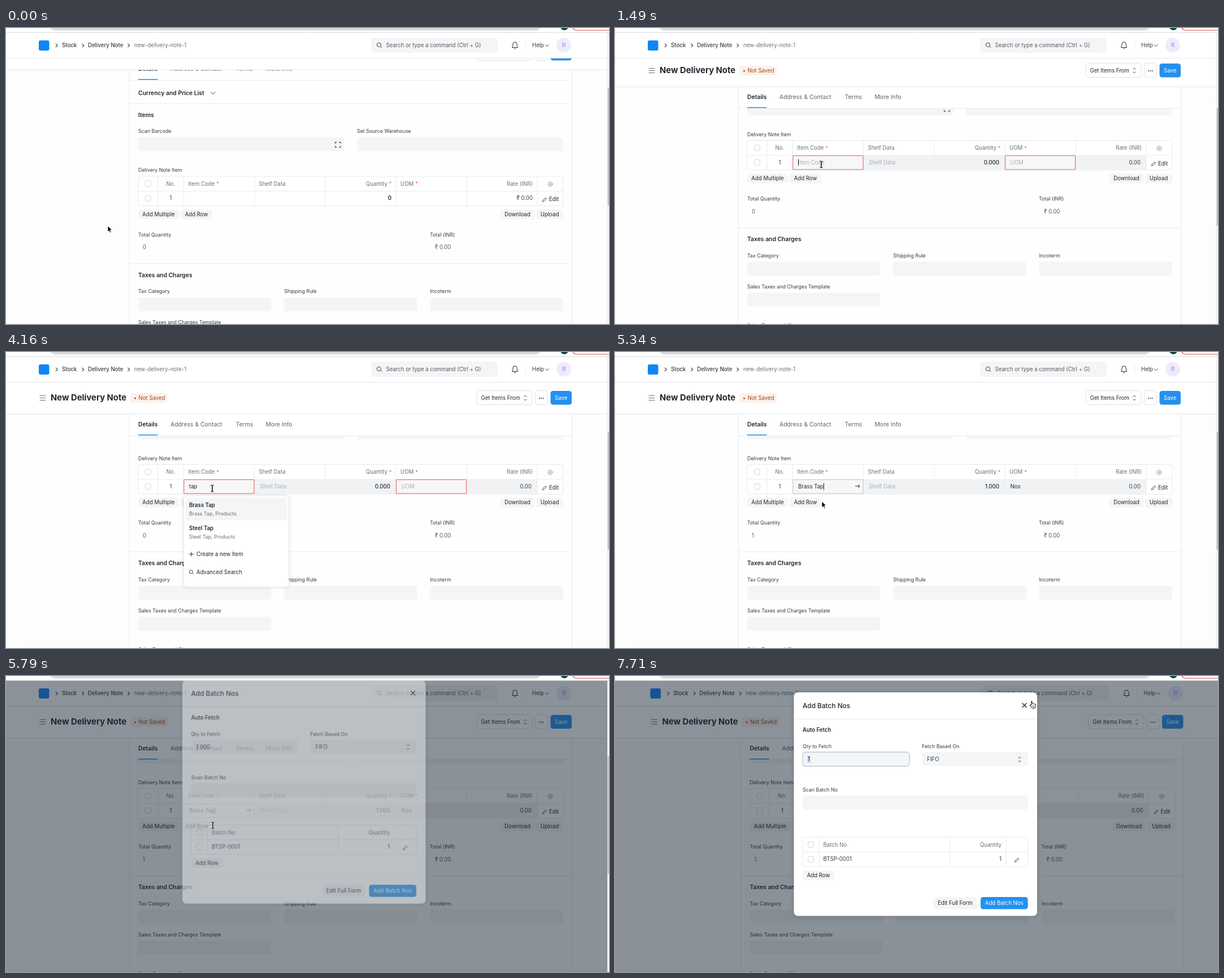
Write an HTML page with a canvas that moves like this. It is 1067 px wide and 525 px high and loops after 8 s.

```html
<!DOCTYPE html>
<html lang="en">
<head>
<meta charset="utf-8">
<title>Delivery note</title>
<style>
  html, body { margin: 0; width: 100%; height: 100%; overflow: hidden; background: #fff; }
  canvas { display: block; width: 1067px; height: 525px; }
</style>
</head>
<body>
<canvas id="stage"></canvas>
<script>
const W = 1067, H = 525, LOOP = 8000, STEP = 148.2;
const dpr = window.devicePixelRatio || 1;
const INK = '#1f272e', TEXT = '#333c44', MUTED = '#687178', HINT = '#a6b1b9';
const LINE = '#e8ebed', FIELD = '#f4f5f6', BLUE = '#2490ef', RED = '#f0625d';
const shade = alpha => `rgba(25,39,52,${alpha})`;
// Interface text sizes, in stage pixels
const SM = 8.9, MD = 9.63, LG = 10.37, XL = 11.85, XXL = 14.8;

function makeCanvas(el) {
  el.width = W * dpr;
  el.height = H * dpr;
  const c = el.getContext('2d');
  c.scale(dpr, dpr);
  return c;
}
const stage = makeCanvas(document.getElementById('stage'));
const layer = makeCanvas(document.createElement('canvas'));
let g = stage;

// y is the middle of the capital letters
function text(s, x, y, size = MD, color = TEXT, weight = 400, align = 'left') {
  g.font = `${weight} ${size}px Inter, sans-serif`;
  g.textAlign = align;
  g.fillStyle = color;
  g.fillText(s, x, y + size * 0.36);
  return g.measureText(s).width;
}

function rect(x, y, x2, y2, fill, r = 0, stroke, lw = 1) {
  g.beginPath();
  g.roundRect(x, y, x2 - x, y2 - y, r);
  if (fill) { g.fillStyle = fill; g.fill(); }
  if (stroke) { g.strokeStyle = stroke; g.lineWidth = lw; g.stroke(); }
}

function poly(pts, color, lw = 1, fill) {
  g.beginPath();
  for (let i = 0; i < pts.length; i += 2) g.lineTo(pts[i], pts[i + 1]);
  if (fill) { g.closePath(); g.fillStyle = fill; g.fill(); }
  g.strokeStyle = color;
  g.lineWidth = lw;
  g.stroke();
}

function circle(x, y, r, fill, stroke, lw = 1) {
  g.beginPath();
  g.arc(x, y, r, 0, Math.PI * 2);
  if (fill) { g.fillStyle = fill; g.fill(); }
  if (stroke) { g.strokeStyle = stroke; g.lineWidth = lw; g.stroke(); }
}

const hline = (x, x2, y, c = LINE) => poly([x, y, x2, y], c);
const vline = (x, y, y2, c = LINE) => poly([x, y, x, y2], c);
const field = (x, x2, y, h = 24.5) => rect(x, y, x2, y + h, FIELD, 4.5);
const checkbox = (x, y) => rect(x - 5, y - 5, x + 5, y + 5, '#fff', 2.5, '#c6cdd3', 0.8);
const chevDown = (x, y, r = 4) => poly([x - r, y - r / 2, x, y + r / 2, x + r, y - r / 2], TEXT);
const chevRight = (x, y) => poly([x - 1.5, y - 3.2, x + 1.8, y, x - 1.5, y + 3.2], TEXT, 1.1);

function upDown(x, y) {
  poly([x - 2.3, y - 2, x, y - 4.3, x + 2.3, y - 2], TEXT);
  poly([x - 2.3, y + 2, x, y + 4.3, x + 2.3, y + 2], TEXT);
}

function button(label, x, x2, y, h = 17, fill = FIELD, color = INK, stroke) {
  rect(x, y, x2, y + h, fill, 4.5, stroke);
  text(label, (x + x2) / 2, y + h / 2, MD, color, 400, 'center');
}

function pencil(x, y) {
  poly([x - 3.5, y + 3.5, x - 2.8, y + 0.8, x + 2, y - 3.6, x + 3.6, y - 2, x - 1, y + 2.8, x - 3.5, y + 3.5], TEXT, 0.9);
}

function lens(x, y, r = 3.6) {
  circle(x - 0.6, y - 0.6, r, null, TEXT, 1);
  poly([x + r * 0.6, y + r * 0.6, x + r * 1.25, y + r * 1.25], TEXT, 1);
}

function required(label, x, y) {
  const w = text(label, x, y, MD, MUTED);
  text('*', x + w + 3, y + 0.5, MD, RED);
}

function scanIcon(x, y) {
  for (const sx of [-1, 1]) for (const sy of [-1, 1])
    poly([x + sx * 4.8, y + sy * 2, x + sx * 4.8, y + sy * 4.5, x + sx * 2, y + sy * 4.5], INK, 1);
}

function gear(x, y) {
  circle(x, y, 1.6, null, MUTED, 0.8);
  g.setLineDash([2, 0.8]);
  circle(x, y, 4, null, MUTED, 1);
  g.setLineDash([]);
}

const COLS = [268.5, 314.5, 439.5, 565, 690, 815, 940];

function itemTable(k) {
  rect(234, 263, 986, 315.5, '#fff', 4, LINE);
  if (k >= 9) rect(440, 290, 940, 315, '#f1f2f4');
  hline(234, 986, 289.5);
  COLS.forEach(x => vline(x, 263, 315.5));
  checkbox(251.5, 276);
  checkbox(251.5, 302);
  text('No.', 291.5, 276.5, MD, MUTED, 400, 'center');
  text('1', 291.5, 302, MD, TEXT, 400, 'center');
  required('Item Code', 322.5, 276.5);
  text('Shelf Data', 447.5, 276.5, MD, MUTED);
  text('Quantity', 675, 276.5, MD, MUTED, 400, 'right');
  text('*', 677.5, 277, MD, RED);
  required('UOM', 698, 276.5);
  text('Rate (INR)', 932, 276.5, MD, MUTED, 400, 'right');
  gear(963, 277);
  pencil(953, 304.5);
  text('Edit', 961, 304, MD, INK);
  if (k < 9) {
    text('0', 682, 302, MD, INK, 600, 'right');
    text('₹ 0.00', 932, 302, MD, TEXT, 400, 'right');
  } else editRow(k);
}

function editRow(k) {
  const picked = k >= 31, filled = k >= 33;
  rect(314.8, 290, 439, 314.5, '#f7f7f8', 1, picked ? '#c3c9ce' : RED, 1.1);
  if (!filled) rect(690.5, 290, 814.5, 314.5, '#f7f7f8', 1, RED, 1.1);
  const typed = picked ? 'Brass Tap' : k >= 18 ? 'tap' : k >= 16 ? 'ta' : k >= 14 ? 't' : '';
  const w = text(typed || 'Item Code', 324, 302, MD, typed ? INK : HINT);
  if (k !== 28) vline(324.5 + (typed ? w : 0), 296, 308, INK);
  if (k >= 29) {
    poly([425, 301.5, 433, 301.5], INK);
    poly([430, 298.5, 433, 301.5, 430, 304.5], INK);
  }
  text('Shelf Data', 449, 302, MD, HINT);
  text(filled ? '1.000' : '0.000', 680, 302, MD, INK, 500, 'right');
  text(filled ? 'Nos' : 'UOM', 699.5, 302, MD, filled ? INK : HINT);
  text('0.00', 930, 302, MD, TEXT, 400, 'right');
}

function suggestions() {
  g.shadowColor = 'rgba(30,40,50,.18)';
  g.shadowBlur = 6;
  rect(315, 319, 500, 480, '#fff', 6);
  g.shadowColor = 'transparent';
  rect(318, 322, 497, 362, FIELD, 4.5);
  text('Brass Tap', 324, 335, MD, INK, 600);
  text('Brass Tap, Products', 324, 350, SM, MUTED);
  text('Steel Tap', 324, 376, MD, INK, 600);
  text('Steel Tap, Products', 324, 391, SM, MUTED);
  poly([328, 418, 328, 426], INK);
  poly([324, 422, 332, 422], INK);
  text('Create a new Item', 337, 422, MD, INK);
  lens(328, 454, 3);
  text('Advanced Search', 337, 454, MD, INK);
}

function form(k, scroll) {
  g.save();
  g.translate(0, -scroll);
  text('Currency and Price List', 234, 115, LG, INK, 600);
  chevDown(366.5, 115.5);
  hline(219, 1001, 134.5);
  text('Items', 234, 154, LG, INK, 600);
  text('Scan Barcode', 234, 183, SM);
  field(234, 598.5, 194);
  scanIcon(587.3, 207);
  text('Set Source Warehouse', 621, 183, SM);
  field(621, 986, 194);
  text('Delivery Note Item', 234, 252, SM);
  itemTable(k);
  button('Add Multiple', 234, 306, 322);
  button('Add Row', 309, 365, 322);
  button('Download', 875, 935, 322);
  button('Upload', 938, 986, 322);
  text('Total Quantity', 234, 366.5, SM);
  text(k >= 33 ? '1' : '0', 242, 389, MD, '#525b63');
  text('Total (INR)', 750, 366.5, SM);
  text('₹ 0.00', 759, 389, MD, '#525b63');
  hline(219, 1001, 418);
  text('Taxes and Charges', 234, 438, LG, INK, 600);
  ['Tax Category', 'Shipping Rule', 'Incoterm'].forEach((label, i) => {
    const x = 234 + i * 258.2;
    text(label, x, 467, SM);
    field(x, x + 235.5, 478);
  });
  text('Sales Taxes and Charges Template', 234, 522, SM);
  field(234, 469.5, 533);
  text('Sales Taxes and Charges', 234, 591, SM);
  if (k >= 21 && k < 31) suggestions();
  g.restore();
}

function tabs(dy) {
  g.save();
  g.translate(0, dy);
  rect(219, 53, 1001, 92.5, '#fff');
  hline(219, 1001, 92.5);
  text('Details', 234, 72, LG, INK, 600);
  text('Address & Contact', 291, 72, LG, '#5a646c');
  text('Terms', 406.5, 72, LG, '#5a646c');
  text('More Info', 459.5, 72, LG, '#5a646c');
  rect(234, 90.5, 268.5, 92, BLUE);
  g.restore();
}

function pageHead(off) {
  g.save();
  g.translate(0, -off);
  g.shadowColor = 'rgba(30,40,50,.1)';
  g.shadowBlur = 2;
  rect(-10, 54, W + 10, 110, '#fff');
  g.shadowColor = 'transparent';
  hline(-10, W, 110);
  for (const y of [77.5, 81.5, 85.5]) hline(59.5, 70.5, y, MUTED);
  text('New Delivery Note', 79, 81, XXL, INK, 700);
  rect(220, 73, 286, 90, '#fdf1ea', 4.5);
  circle(228.5, 82, 1.5, '#a3451f');
  text('Not Saved', 234.5, 82, MD, '#a3451f');
  rect(833, 68.5, 931, 93.5, '#fff', 4.5, '#dde1e4');
  text('Get Items From', 840.5, 81.5, MD, INK);
  upDown(919, 81.5);
  rect(936.5, 68.5, 958.5, 93.5, '#fff', 4.5, '#dde1e4');
  for (const x of [944, 947.3, 950.6]) circle(x, 82, 0.9, INK);
  button('Save', 963.5, 1001, 69, 24.5, BLUE, '#fff');
  g.restore();
}

function navbar() {
  rect(-10, 8, W + 10, 53.5, '#fff');
  hline(-10, W, 53.5, '#e4e7ea');
  rect(58, 22, 76.5, 40, '#0f86f5', 3);
  [89.5, 136, 217].forEach(x => chevRight(x, 31));
  text('Stock', 99, 31, MD, TEXT, 500);
  text('Delivery Note', 145, 31, MD, TEXT, 500);
  text('new-delivery-note-1', 227, 31, MD, MUTED);
  rect(646, 17, 870, 44, FIELD, 5);
  lens(660.5, 30.5);
  text('Search or type a command (Ctrl + G)', 672.5, 31, MD, '#525b63');
  g.beginPath();
  g.moveTo(895.5, 34.5);
  g.quadraticCurveTo(897, 33, 897, 29);
  g.arc(900.5, 28.5, 3.6, Math.PI, 0);
  g.quadraticCurveTo(904, 33, 905.7, 34.5);
  g.closePath();
  g.strokeStyle = INK;
  g.stroke();
  poly([899, 36, 900.5, 37, 902, 36], INK);
  vline(919.5, 23, 38);
  text('Help', 931, 31, MD, TEXT);
  chevDown(957.3, 31, 3.3);
  circle(987, 30.5, 13, '#efebfc');
  text('R', 987, 30.5, LG, '#9684ec', 400, 'center');
}

function dialogBox(fresh, focused) {
  g.shadowColor = 'rgba(20,30,40,.25)';
  g.shadowBlur = 6;
  rect(316.5, 29, 747, 425.5, '#fff', 7);
  g.shadowColor = 'transparent';
  text('Add Batch Nos', 332, 53, XL, INK, 500);
  poly([720.5, 48, 728.5, 56], INK, 1.2);
  poly([728.5, 48, 720.5, 56], INK, 1.2);
  hline(317, 746.5, 76.5);
  text('Auto Fetch', 332, 96, MD, INK, 600);
  text('Qty to Fetch', 332, 124.5, SM);
  field(332, 520.5, 135);
  if (focused) {
    rect(332, 135, 521, 160, FIELD, 5, '#cfd4d8', 1.8);
    rect(340.5, 141, 346, 154, '#bcdafb');
  }
  text(focused ? '1' : '1.000', 341, 147.5, MD, INK);
  text('Fetch Based On', 543, 124.5, SM);
  field(543, 730.5, 135);
  text('FIFO', 552, 147.5, MD, TEXT);
  upDown(716, 148);
  text('Scan Batch No', 332, 201.5, SM);
  field(332, 730.5, 212);
  rect(332.5, 286, 730.5, 338, '#fff', 4, LINE);
  hline(332.5, 730.5, 312);
  [361, 592.5, 692].forEach(x => vline(x, 286, 338));
  checkbox(346.5, 299);
  checkbox(346.5, 325);
  text('Batch No', 368.5, 299.5, MD, MUTED);
  text('Quantity', 684, 299.5, MD, MUTED, 400, 'right');
  text('BTSP-0001', 368.5, 325, MD, TEXT);
  text('1', 684, 325, MD, TEXT, 400, 'right');
  pencil(711, 326.5);
  button('Add Row', 332, 388, 345);
  button('Edit Full Form', 564, 640, 392, 21.5);
  button('Add Batch Nos', 647, 730.5, 392, 21.5, BLUE, '#fff');
  if (fresh) {
    g.globalCompositeOperation = 'source-atop';
    rect(0, 0, W, H, shade(0.15));
    g.globalCompositeOperation = 'source-over';
  }
}

// Drawn on its own layer so that it fades in as one piece
function dialog(k) {
  const fresh = k === 39;
  layer.clearRect(0, 0, W, H);
  g = layer;
  dialogBox(fresh, k >= 43);
  g = stage;
  g.save();
  g.globalAlpha = fresh ? 0.6 : 1;
  g.drawImage(layer.canvas, fresh ? -4.5 : 0, fresh ? -21.7 : 0, W, H);
  g.restore();
}

function browserTop() {
  rect(0, 0, W, 8, '#fff');
  rect(77, -20, 947, 4.5, '#dadbdd', 10);
  circle(988, -3, 7, '#0d4a42');
  rect(1002, -20, 1090, 4, '#fff', 8, '#d9453d', 1.2);
  hline(0, W, 8, '#d5d7d9');
}

// Pointer: step, x, y
const PATH = [[0, 180, 351], [5, 241, 281], [7, 330, 241], [9, 365, 242], [31, 365, 242],
  [35, 366, 265], [40, 366, 265], [43, 406, 152], [46, 406, 152], [47, 440, 162],
  [48, 505, 163], [49, 590, 142], [50, 670, 102], [51, 724, 62], [52, 739, 51], [54, 739, 51]];

function pointer(k) {
  const i = PATH.findIndex(p => p[0] > k);
  const [k0, x0, y0] = PATH[i - 1], [k1, x1, y1] = PATH[i];
  const f = (k - k0) / (k1 - k0);
  g.save();
  g.translate(x0 + (x1 - x0) * f, y0 + (y1 - y0) * f);
  g.lineJoin = 'round';
  if (k >= 52) hand();
  else if ((k >= 9 && k < 32) || (k >= 39 && k < 47)) iBeam();
  else poly([0, 0, 0, 10.5, 2.4, 8.4, 4.2, 12.3, 6, 11.4, 4.3, 7.7, 7.6, 7.4], '#fff', 0.8, '#000');
  g.restore();
}

function iBeam() {
  for (const [c, w] of [['#fff', 2.4], ['#111', 1.1]]) {
    for (const s of [-1, 1])
      poly([s * 2.8, -5.8, s * 1.2, -5.6, 0, -4.5, 0, 4.5, s * 1.2, 5.6, s * 2.8, 5.8], c, w);
  }
}

function hand() {
  poly([-2.5, -6, -1, -6, -0.6, -1.8, 0.6, -2.4, 1.6, -1.5, 2.8, -2, 3.7, -0.9, 5, -1,
    5.5, 1, 4.2, 6, -1.2, 6, -5, 1, -4.2, 0, -2.2, 1.2], '#111', 1, '#fff');
  poly([0.2, 1, 0.4, 4], '#111', 0.7);
  poly([2.3, 1, 2.3, 4], '#111', 0.7);
}

// How far the page header is tucked under the navbar
function headOffset(k) {
  if (k === 0) return 36;
  if (k < 8) return 56;
  return k < 11 ? [44, 22, 6][k - 8] : 0;
}

function draw(k) {
  const scroll = 63.5 * (1 - (1 - Math.min(k / 5, 1)) ** 2);
  const off = headOffset(k);
  const locked = k >= 40;
  g.fillStyle = '#fdfdfd';
  g.fillRect(0, 0, W, H);
  g.save();
  if (locked) g.translate(4.5, 0);
  hline(36, 1064, 524.5, '#f3f3f3');
  rect(218.5, -20, 1001.5, H + 20, '#fefefe', 0, '#e6e9eb');
  form(k, scroll);
  tabs(k < 8 ? 0 : 56 - off);
  pageHead(off);
  navbar();
  g.restore();
  if (!locked) {
    rect(1064, 8, W, H, '#fafafa');
    vline(1064.3, 8, H, '#e6e6e6');
    const top = 106 + scroll * 0.567;
    rect(1064.6, top, W + 2, top + 209, '#c2c2c4', 1.5);
  }
  if (k >= 37) rect(0, 8, locked ? W : 1064, H, shade(k === 37 ? 0.25 : 0.5));
  if (k >= 39) dialog(k);
  browserTop();
  pointer(k);
}

const start = performance.now();
function tick() {
  const t = (performance.now() - start) % LOOP;
  draw(Math.max(0, Math.min(53, Math.floor((t - 3) / STEP))));
  requestAnimationFrame(tick);
}
tick();
</script>
</body>
</html>
```
